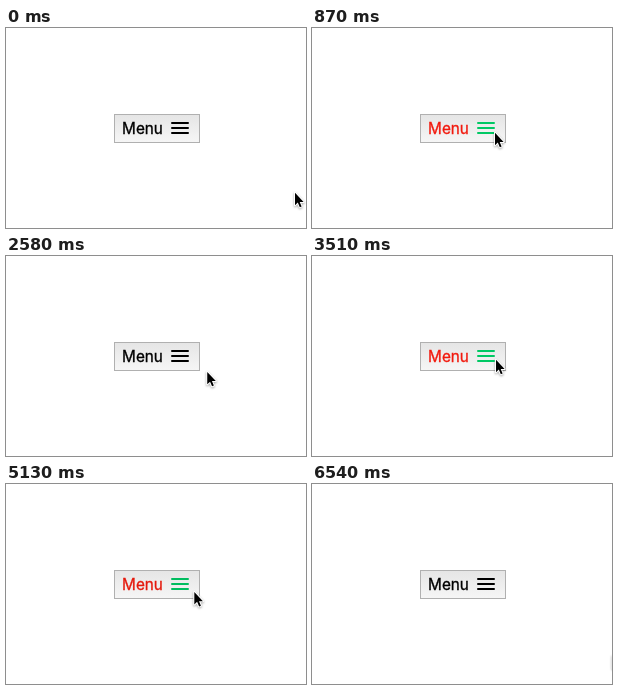
An HTML page for the animation above (7080 ms loop, 300 by 200 pixels).

```html
<!DOCTYPE html>
<html lang="en">
<head>
<meta charset="utf-8">
<title>Menu button hover</title>
<style>
html, body { margin: 0; width: 100%; height: 100%; overflow: hidden; background: #fff; }
svg { display: block; width: 300px; height: 200px; }
text { font: 15.3px Inter, "Open Sans", sans-serif; stroke-width: .3; }
#cursor { filter: drop-shadow(0 1px 1px rgba(0, 0, 0, .35)); }
</style>
</head>
<body>
<svg viewBox="0 0 300 200">
  <defs>
    <linearGradient id="face" x2="0" y2="1">
      <stop offset="0" stop-color="#e5e5e5"/>
      <stop offset="1" stop-color="#f6f6f6"/>
    </linearGradient>
  </defs>
  <rect x="108.5" y="86.5" width="85" height="28" fill="url(#face)" stroke="#b0b0b0"/>
  <text id="label" x="116.1" y="106">Menu</text>
  <path id="bars" d="M166 95h16m-16 5h16m-16 5h16" stroke-width="2" stroke-linecap="round"/>
  <path id="cursor" d="M2 1.8V14.2L4.8 11.5L6.8 16.2L8.6 15.4L6.7 10.9H10.6Z"
    stroke="#fff" stroke-width="2" paint-order="stroke" stroke-linejoin="round"/>
</svg>
<script>
const LOOP = 7080, FADE = 300;
const RED = [242, 26, 14], GREEN = [0, 200, 100];
const HOME = { x: 287, y: 163 };
const BUTTON = { right: 194, bottom: 115 };

// A move to (x, y); a higher power slows down more towards the end
const glide = (start, end, x, y, power = 1) => ({ start, end, x, y, power });

const moves = [
  glide(30, 870, 181, 103, 3),
  glide(1230, 2070, 209, 121),
  glide(2310, 3060, 182, 102),
  glide(3510, 4410, 202, 118),
  glide(4590, 5280, 182, 103),
  glide(5490, 5910, 213, 122),
  glide(5910, 6540, 298.6, 170, 1.5)
];

const clamp = value => Math.min(1, Math.max(0, value));
const easeOut = (p, power) => 1 - Math.pow(1 - clamp(p), power);

function pointerAt(time) {
  return moves.reduce((from, move) => {
    const p = easeOut((time - move.start) / (move.end - move.start), move.power);
    return { x: from.x + (move.x - from.x) * p, y: from.y + (move.y - from.y) * p };
  }, HOME);
}

function isHovering(time) {
  const { x, y } = pointerAt(time);
  return x + 1 < BUTTON.right && y + 1 < BUTTON.bottom;
}

// Each crossing of the button's edge starts a fade in or out
const crossings = [];
for (let time = 10; time < LOOP; time += 10) {
  const inside = isHovering(time);
  if (inside !== isHovering(time - 10)) crossings.push({ time, sign: inside ? 1 : -1 });
}

const hoverAmount = time => crossings.reduce((sum, crossing) =>
  sum + crossing.sign * easeOut((time - crossing.time) / FADE, 2.2), 0);

const tint = (color, amount) => `rgb(${color.map(c => Math.round(c * amount))})`;

function paint(id, color) {
  const shape = document.getElementById(id);
  shape.setAttribute("fill", color);
  shape.setAttribute("stroke", color);
}

function draw(time) {
  const amount = hoverAmount(time);
  paint("label", tint(RED, amount));
  paint("bars", tint(GREEN, amount));
  const { x, y } = pointerAt(time);
  document.getElementById("cursor").setAttribute("transform", `translate(${x} ${y})`);
}

const start = performance.now();
function tick() {
  draw((performance.now() - start) % LOOP);
  requestAnimationFrame(tick);
}
tick();
</script>
</body>
</html>
```
